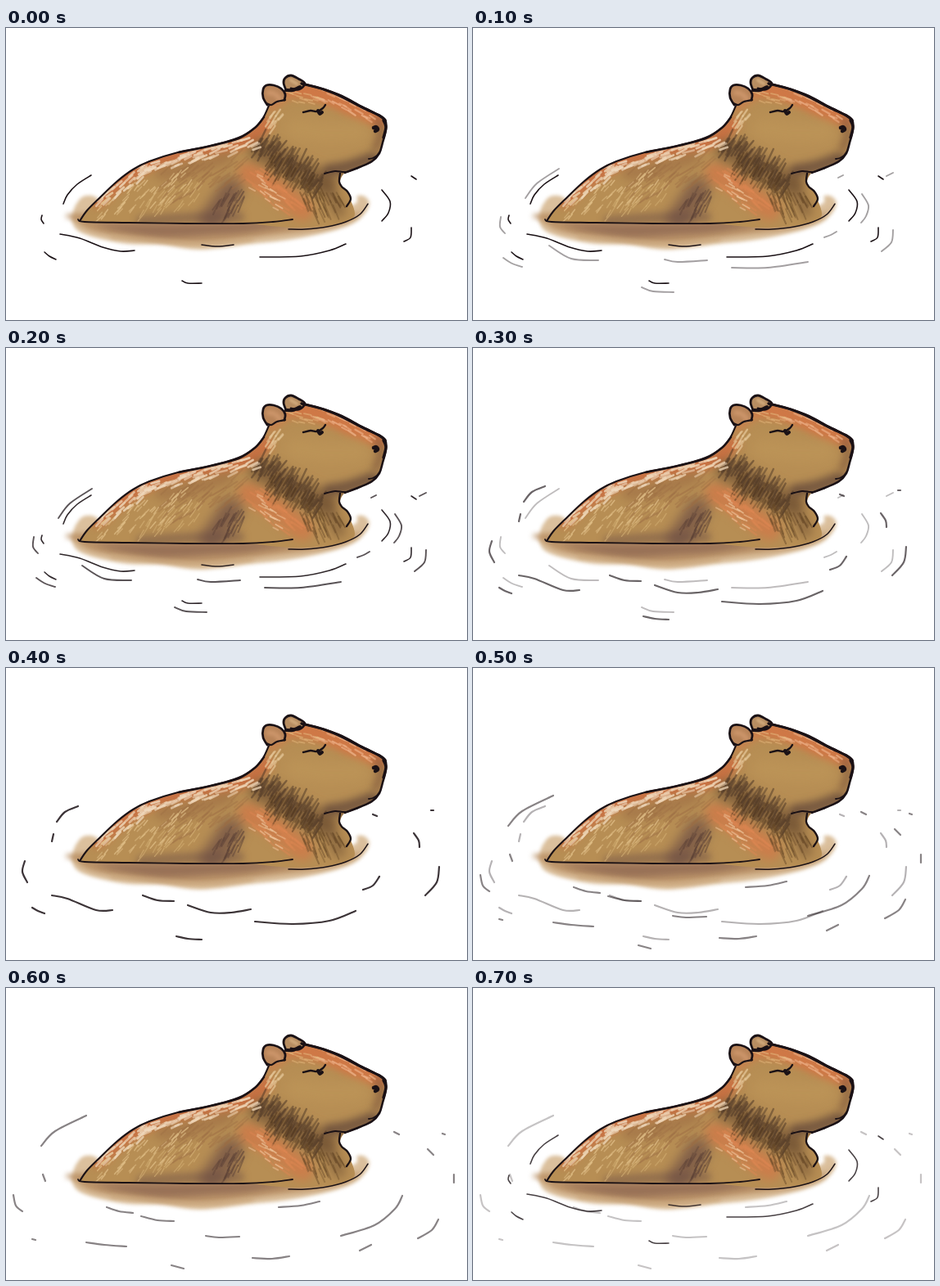
These frames come from a looping animation (563 px wide and 357 px high, 0.8 s). An HTML page with a canvas:

```html
<!DOCTYPE html>
<html lang="en">
<head>
<meta charset="utf-8">
<title>Capybara in water</title>
<style>
html, body { margin: 0; width: 100%; height: 100%; overflow: hidden; background: #fff; }
canvas { display: block; }
</style>
</head>
<body>
<canvas id="stage" width="563" height="357"></canvas>
<script>
const W = 563, H = 357, STEP = 100;
const view = document.getElementById('stage').getContext('2d');
const art = document.createElement('canvas');
art.width = W;
art.height = H;
const g = art.getContext('2d');
const INK = '#1a1115';

let seed = 11;
const rnd = () => (seed = (seed * 16807) % 2147483647) / 2147483647;

// Smooth path through "x,y x,y ..."
function curve(text) {
  const p = text.split(' ').map(s => s.split(',').map(Number));
  const path = new Path2D();
  path.moveTo(...p[0]);
  for (let i = 0; i < p.length - 1; i++) {
    const a = p[i - 1] || p[i], b = p[i], c = p[i + 1], d = p[i + 2] || c;
    path.bezierCurveTo(b[0] + (c[0] - a[0]) / 6, b[1] + (c[1] - a[1]) / 6,
      c[0] - (d[0] - b[0]) / 6, c[1] - (d[1] - b[1]) / 6, c[0], c[1]);
  }
  return path;
}

function line(c, path, color, width) {
  c.strokeStyle = color;
  c.lineWidth = width;
  c.lineCap = c.lineJoin = 'round';
  c.stroke(path);
}

const ink = (text, width) => line(g, curve(text), INK, width);

function fill(text, color, alpha = 1, blur = 0) {
  g.save();
  g.globalAlpha = alpha;
  g.filter = blur ? `blur(${blur}px)` : 'none';
  g.fillStyle = color;
  g.fill(curve(text));
  g.restore();
}

function glow(text, color, width, alpha, blur) {
  g.save();
  g.globalAlpha = alpha;
  g.filter = `blur(${blur}px)`;
  line(g, curve(text), color, width);
  g.restore();
}

// Short brush marks scattered around a straight axis
function hairs(x0, y0, x1, y1, spread, count, angle, len, width, color, alpha) {
  const d = Math.hypot(x1 - x0, y1 - y0);
  g.save();
  for (let i = 0; i < count; i++) {
    const t = (i + rnd()) / count, off = (rnd() - 0.5) * spread;
    const x = x0 + (x1 - x0) * t - (y1 - y0) / d * off;
    const y = y0 + (y1 - y0) * t + (x1 - x0) / d * off;
    const a = (angle + (rnd() - 0.5) * 16) * Math.PI / 180, r = len * (0.35 + rnd() * 0.25);
    const mark = new Path2D();
    mark.moveTo(x - Math.cos(a) * r, y - Math.sin(a) * r);
    mark.lineTo(x + Math.cos(a) * r, y + Math.sin(a) * r);
    g.globalAlpha = alpha * (0.6 + rnd() * 0.4);
    line(g, mark, color, width);
  }
  g.restore();
}

const back = '90,236 99,223 115,207 135,188 155,173 175,163 210,152 250,144 284,134 304,122 314,110 321,95';
const face = '361,68 385,74 410,83 434,96 454,106 463,112 464,124 460,140 456,153 447,163 432,170 414,177';
const chest = '408,178 407,188 410,194 417,200 421,209 416,218';
const body = back + ' 338,78 ' + face + ' 408,190 418,201 421,210 425,231 400,241 350,244 290,239 220,239 150,238 90,236';

function water() {
  fill('80,235 86,215 104,205 160,222 400,220 430,205 443,211 440,224 425,238 395,249 345,259 300,264 238,271 190,265 150,264 112,257 88,248 80,235', '#d5b58c', 0.85, 2);
  fill('84,236 100,226 400,228 434,217 424,234 385,246 320,254 240,263 160,258 105,248 84,236', '#b88d61', 0.85, 3);
  fill('104,240 200,239 345,238 300,249 250,253 190,256 140,249 104,240', '#8c6650', 0.75, 4);
  glow('130,255 180,259 240,264 300,258', '#caa57a', 5, 0.6, 2);
}

function coat() {
  g.save();
  g.clip(curve(body));
  g.fillStyle = '#b78e54';
  g.fillRect(0, 0, W, H);

  // Rusty back, brow and shoulder
  glow('112,211 145,184 182,163 230,151 290,139 318,117', '#cb6f42', 17, 0.9, 4);
  glow('352,74 390,83 425,99 456,112', '#d27645', 20, 0.9, 4);
  glow('324,96 336,86 347,80', '#cf7c4b', 13, 0.65, 4);
  glow('296,178 320,190 345,209 362,222', '#d27848', 26, 0.75, 6);

  // Shaded fur
  glow('190,178 225,172 270,158', '#9c6b43', 16, 0.6, 6);
  glow('310,150 330,158 355,174 390,190', '#694a30', 26, 0.7, 7);
  glow('394,174 420,169 448,159', '#604638', 15, 0.75, 5);
  glow('390,190 398,207 407,224', '#715333', 16, 0.55, 6);
  glow('275,198 263,216 250,235', '#705044', 28, 0.75, 7);
  glow('165,236 225,232 285,231', '#6f5146', 12, 0.5, 4);
  glow('454,112 458,128 452,146', '#80583e', 10, 0.65, 4);
  glow('354,123 390,128 430,127', '#c0975a', 25, 0.55, 7);

  hairs(190, 195, 290, 169, 40, 55, -38, 17, 2, '#9b6c43', 0.45);
  hairs(306, 142, 388, 188, 28, 65, -58, 19, 2.4, '#513a28', 0.62);
  hairs(320, 163, 370, 196, 28, 30, -58, 17, 2, '#52381f', 0.55);
  hairs(362, 205, 405, 225, 35, 38, 66, 16, 2, '#674927', 0.55);
  hairs(260, 225, 287, 204, 22, 24, -60, 17, 2, '#553c33', 0.5);
  hairs(302, 181, 355, 222, 27, 32, 38, 14, 2.5, '#dc8652', 0.55);

  // Pale flecks
  hairs(113, 214, 175, 171, 12, 25, -41, 10, 2.7, '#efd8b9', 0.85);
  hairs(162, 174, 238, 156, 12, 28, -22, 11, 2.7, '#f0d9be', 0.85);
  hairs(228, 158, 307, 140, 15, 28, -22, 12, 2.7, '#f0d6b7', 0.85);
  hairs(320, 121, 334, 103, 13, 12, -55, 11, 2.3, '#e7c99b', 0.75);
  hairs(108, 220, 225, 187, 33, 55, -47, 10, 1.5, '#e2c18a', 0.75);
  hairs(160, 219, 240, 204, 28, 32, -53, 11, 1.4, '#d5b175', 0.7);
  hairs(302, 187, 337, 217, 22, 17, 31, 9, 1.8, '#eec49a', 0.75);
  hairs(376, 77, 449, 110, 14, 25, 27, 9, 2.2, '#efb48b', 0.75);
  hairs(343, 84, 384, 89, 14, 14, 15, 8, 1.8, '#e4b77d', 0.65);
  g.restore();
}

function ears() {
  const near = '319,94 314,85 314,75 318,70 327,70 336,74 341,81 340,88';
  const far = '342,76 339,67 341,61 348,58 357,62 365,68 358,75 348,74';
  fill(far + ' 342,76', '#b78d61');
  fill(near + ' 330,92 319,94', '#b88459');
  glow('321,79 329,81 334,87', '#d39b70', 6, 0.75, 2);
  glow('348,64 355,68', '#d5ae80', 4, 0.8, 1);
  ink(near, 2.8);
  ink(far, 2.8);
  ink('342,76 350,76 359,72', 4);
  ink('318,92 324,94 331,90 341,88', 2.2);
}

function outlines() {
  ink(back, 2.1);
  ink('211,152 250,144 284,135 304,122 315,109', 2.6);
  ink(face, 2.6);
  ink('361,68 388,75 410,84 435,97 456,107 463,113', 3.2);
  ink('389,178 402,175 415,176 430,171', 2);
  ink(chest, 2.3);
  ink('88,234 96,237 150,238 220,239 289,239 326,237 350,234', 1.8);
  ink('345,246 365,246 392,243 415,237 432,228 442,215', 1.5);

  // Eye, nostril and mouth
  ink('363,103 372,101 380,102 387,98 390,94', 2.4);
  ink('381,101 383,105 386,103', 4);
  ink('449,122 452,121 454,124 451,126', 4.5);
  ink('443,160 448,159 453,156 456,152', 1.8);
  ink('461,113 464,121 461,134', 3.4);
}

const rings = [
  { width: 1.6, alpha: [1, 1, 0.9, 0, 0, 0, 0, 0.8], strokes: [
    '70,215 75,204 87,191 104,180', '44,229 43,234 46,239',
    '66,252 90,257 118,268 140,273 157,272', '47,274 53,279 61,283',
    '239,265 258,267 278,265', '310,280 360,279 395,272 415,264',
    '215,309 222,312 239,312', '459,198 469,212 467,226 459,236',
    '495,181 501,185', '495,244 494,256 486,261'] },
  { width: 1.9, alpha: [0, 0.4, 0.72, 0.28, 0, 0, 0, 0], strokes: [
    '64,208 78,190 105,172', '34,231 33,243 39,251',
    '93,266 120,282 153,284', '37,281 48,288 60,292',
    '234,283 250,286 286,284', '316,293 360,293 409,286',
    '206,317 220,322 245,323', '475,203 483,217 480,230 474,238',
    '505,181 513,177', '513,247 511,262 499,273',
    '429,256 437,253 444,249', '446,183 452,180'] },
  { width: 2.2, alpha: [0, 0, 0, 0.65, 0.85, 0.32, 0, 0], strokes: [
    '62,188 72,176 88,169', '58,203 56,212', '23,236 20,249 26,262',
    '56,278 75,282 110,296 130,296', '32,293 39,297 47,300',
    '167,278 185,284 205,285', '222,290 250,299 275,299 299,295',
    '304,310 350,313 395,309 427,297', '208,328 222,331 239,332',
    '436,271 448,266 456,255', '498,202 504,211 505,219',
    '529,243 526,262 512,278', '448,179 453,181', '519,174 522,174'] },
  { width: 2.2, alpha: [0, 0, 0, 0, 0, 0.52, 0.52, 0.25], strokes: [
    '43,193 60,175 98,156', '9,253 12,266 20,273', '45,228 48,236',
    '32,307 36,308', '123,268 138,273 155,275', '165,279 185,284 205,285',
    '98,311 120,314 147,316', '244,303 260,305 285,304',
    '333,268 360,266 383,261', '301,330 325,331 346,328',
    '409,303 450,290 475,270 484,254', '202,339 217,343',
    '432,321 446,314', '528,283 520,296 503,306', '547,228 547,238',
    '474,176 480,179', '533,178 536,179', '515,197 522,204'] }
];
rings.forEach(r => r.paths = r.strokes.map(curve));

function draw(now) {
  const step = Math.floor(now / STEP) % 8;
  view.fillStyle = '#fff';
  view.fillRect(0, 0, W, H);
  view.drawImage(art, 0, 0);
  for (const r of rings) {
    view.globalAlpha = r.alpha[step];
    if (r.alpha[step]) r.paths.forEach(p => line(view, p, INK, r.width));
  }
  view.globalAlpha = 1;
}

water();
coat();
ears();
outlines();

let start;
function tick(now) {
  start ??= now;
  draw(now - start);
  requestAnimationFrame(tick);
}
draw(0);
requestAnimationFrame(tick);
</script>
</body>
</html>
```
